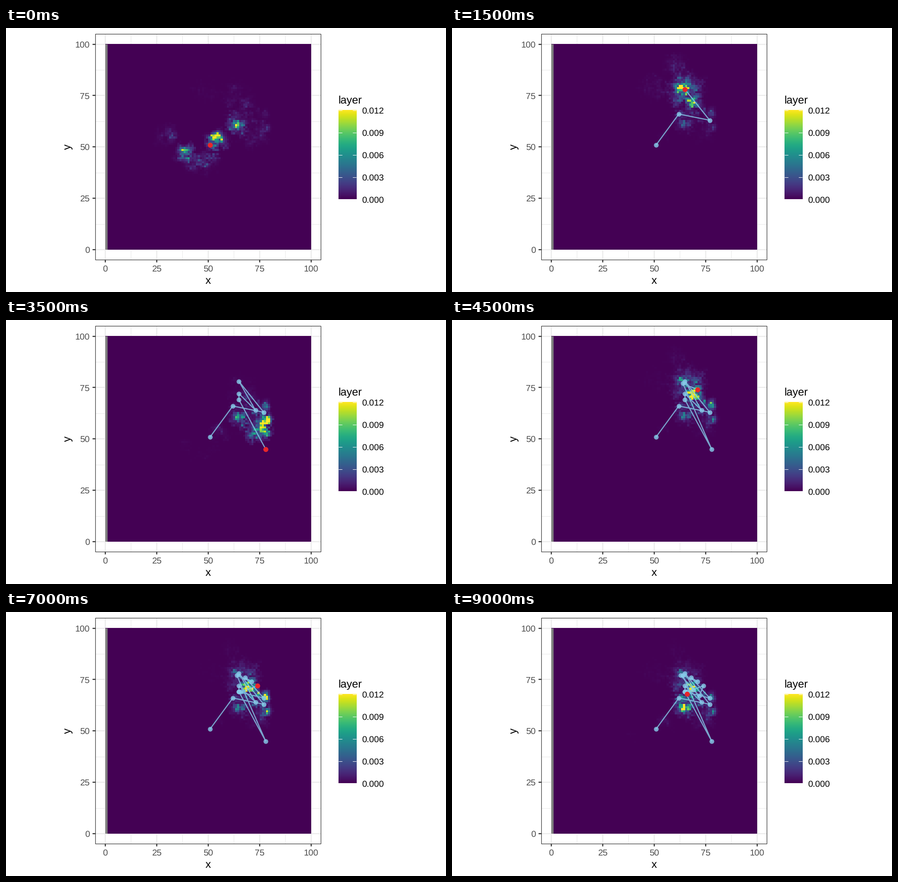
A matplotlib script that plays this animation: 966x580 px, repeating every 9500 ms.

```python
import matplotlib
matplotlib.rcParams["toolbar"] = "None"
import matplotlib.pyplot as plt
import numpy as np
from matplotlib.animation import FuncAnimation
from matplotlib.patches import Rectangle

W, H, DPI = 966, 580, 100
PX = 72 / DPI
X0, Y0, UNIT = 218, 487, 4.515
TOP = 0.012
KERNEL = 6.0

# Places visited by the walker, one per step
PATH = np.array([
    (51, 51), (62, 66), (77, 63), (65, 78), (73, 64), (65, 72), (65, 69),
    (78, 45), (64, 77), (71, 74), (68, 76), (77, 66), (65, 69), (66, 69),
    (74, 72), (72, 67), (63, 77), (69, 70), (66, 68)])

# Resource patches: x, y, spread, strength
PATCHES = [
    (54.5, 53.5, 2.8, 3), (38, 47.5, 2.4, 10), (28, 56, 3, 7),
    (42, 42, 2.6, 3), (50, 43, 3.2, 1.2), (65, 63, 3.2, 14),
    (70, 70, 2.5, 15), (77, 66.5, 1.7, 34), (77, 59, 2.4, 18),
    (65, 78, 4.6, 6), (60, 91, 3.2, 4), (47, 79, 4, 3), (73, 57, 4, 6)]


def px(x, y):
    return X0 + UNIT * np.asarray(x), Y0 - UNIT * np.asarray(y)


gx, gy = np.meshgrid(np.arange(100) + 0.5, np.arange(100) + 0.5)


def make_field():
    """Ragged patches: smooth bumps times grainy, clumped noise."""
    rng = np.random.default_rng(12)
    grain = rng.normal(size=gx.shape)
    clump = sum(np.roll(grain, (i, j), (0, 1))
                for i in (-1, 0, 1) for j in (-1, 0, 1)) / 3
    rough = np.exp(0.5 * clump + 0.35 * rng.normal(size=gx.shape))
    rough /= rough.mean()
    field = np.zeros_like(gx)
    for x, y, s, a in PATCHES:
        bump = np.exp(-((gx - x) ** 2 + (gy - y) ** 2) / (2 * s * s))
        field += a * np.clip(bump * rough - 0.05, 0, None)
    return field


FIELD = make_field()


def layer(x, y):
    """Chance of each cell being next: resources weighted by distance."""
    p = FIELD * np.exp(-np.hypot(gx - x, gy - y) / KERNEL)
    return p / p.sum()


plt.rcParams.update({"font.family": "Liberation Sans",
                     "text.hinting": "none"})
fig = plt.figure(figsize=(W / DPI, H / DPI), dpi=DPI, facecolor="white")
ax = fig.add_axes([0, 0, 1, 1])
ax.axis("off")


def line(xs, ys, color, width, z):
    ax.plot(xs, ys, color=color, lw=width * PX, zorder=z,
            solid_capstyle="butt")


def label(x, y, s, size=19.4, color="black", **kw):
    kw.setdefault("va", "baseline")
    ax.text(x, y, s, size=size * PX, color=color, zorder=9, **kw)


# Panel, grid and axes
L, R, T, B = 196, 691, 13, 509
for v in np.arange(0, 100.1, 12.5):
    major = v % 25 == 0
    vx, vy = px(v, v)
    width = 2.3 if major else 1.15
    line([vx, vx], [T, B], "#ebebeb", width, 1)
    line([L, R], [vy, vy], "#ebebeb", width, 1)
    if major:
        line([vx, vx], [B, B + 6], "#333333", 2.3, 1)
        line([L - 6, L], [vy, vy], "#333333", 2.3, 1)
        label(vx, 535, f"{v:.0f}", color="#4d4d4d", ha="center")
        label(184, vy + 7, f"{v:.0f}", color="#4d4d4d", ha="right")
ax.add_patch(Rectangle((L, T), R - L, B - T, fill=False, ec="#333333",
                       lw=1.2 * PX, zorder=8))
label(443.7, 562, "x", 24, ha="center")
label(135.5, 261, "y", 24, ha="center", va="center", rotation=90)

# Raster with its empty first column
right, top = px(100, 100)
raster = ax.imshow(layer(*PATH[0]), cmap="viridis", vmin=0, vmax=TOP,
                   origin="lower", extent=(X0, right, Y0, top),
                   interpolation="nearest", aspect="auto", zorder=3)
ax.add_patch(Rectangle((X0, top), UNIT, Y0 - top, fc="#7f7f7f", lw=0,
                       zorder=4))

# Colour bar
BL, BR, BT, BB = 729.5, 769, 181, 376.5
ax.imshow(np.linspace(0, 1, 300)[:, None], cmap="viridis", origin="lower",
          extent=(BL, BR, BB, BT), aspect="auto", zorder=3)
label(729, 166, "layer", 24)
for v in np.linspace(0, TOP, 5):
    y = BB - (BB - BT) * v / TOP
    line([BL, BL + 8], [y, y], "white", 1.0, 4)
    line([BR - 8, BR], [y, y], "white", 1.0, 4)
    label(781, y + 7, f"{v:.3f}")

# Walker and its trail
dot = dict(ls="none", marker="o", mew=0, snap=False)
trail, = ax.plot([], [], color="#87ceeb", alpha=0.8, lw=2.4 * PX, zorder=5)
past, = ax.plot([], [], color="#87ceeb", alpha=0.8, ms=10.4 * PX, zorder=6,
                **dot)
now, = ax.plot([], [], color="#e8262a", ms=11 * PX, zorder=7, **dot)

ax.set_xlim(0, W)
ax.set_ylim(H, 0)


def draw(i):
    xs, ys = px(PATH[:i + 1, 0], PATH[:i + 1, 1])
    raster.set_data(layer(*PATH[i]))
    trail.set_data(xs, ys)
    past.set_data(xs[:-1], ys[:-1])
    now.set_data(xs[-1:], ys[-1:])
    return raster, trail, past, now


anim = FuncAnimation(fig, draw, frames=len(PATH), interval=500, repeat=True,
                     repeat_delay=0, blit=False)
plt.show()
```
